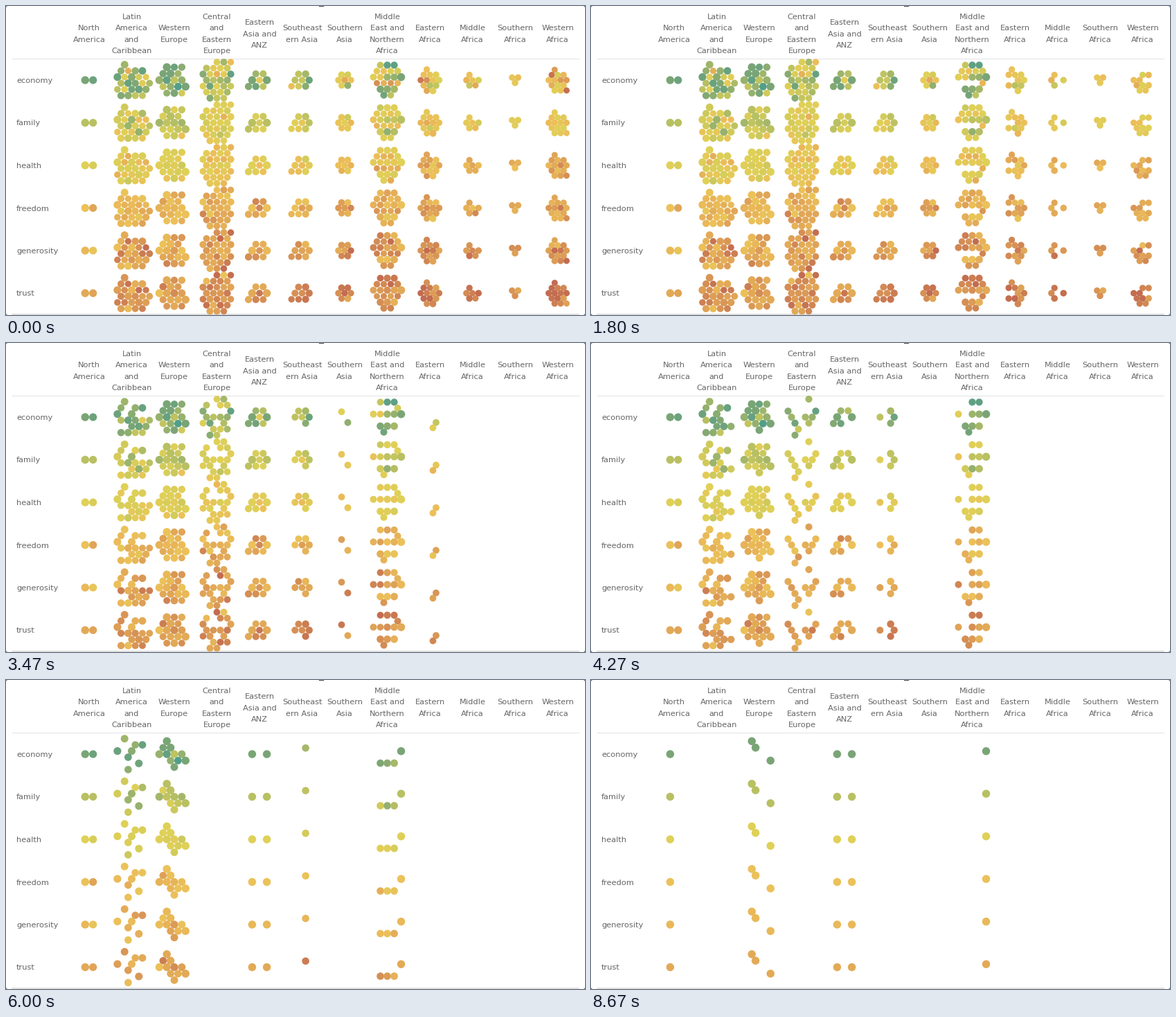
Recreate the animation shown at these times as a matplotlib script. Size 836 px wide and 446 px high, loop 8740 ms.

```python
import numpy as np
import matplotlib.pyplot as plt
from matplotlib.animation import FuncAnimation
from matplotlib.colors import LinearSegmentedColormap

W, H, DPI = 836, 446, 128
FRAMES, LOOP = 131, 8740
STEP = 61.5          # distance between columns and between rows
LEFT, TOP = 120, 107  # centre of the first cell
GREY = "#666666"
PX = 72 / DPI

rng = np.random.default_rng(11)
ramp = LinearSegmentedColormap.from_list(
    "score", ["#c36c50", "#dc9c56", "#ecbf59", "#dfd057",
              "#b8c062", "#7aa576", "#4c9d8c"])

# Each factor: base, gain with happiness, cap, noise (in colour steps).
FACTORS = {"economy": (-.4, 9, 5, .5), "family": (1.7, 2.8, 4, .4),
           "health": (.4, 4.2, 3, .25), "freedom": (1, 1.1, 2.2, .4),
           "generosity": (.4, 1.4, 2.2, .45), "trust": (.1, 1.3, 2, .4)}

dots = []  # x, y, radius, colour step, frame at which the dot leaves


def region(col, rows, pitch, span, late=(), stay=(), lean=0):
    """Hex-packed cluster given by its row lengths.

    Dots leave evenly over the frames in span, in random order except for
    the late ones; those in stay never leave. lean shifts the first row
    by half steps.
    """
    cells = []
    for i, n in enumerate(rows):
        k = 1 - n + (lean if i == 0 else 0)
        if i == 0:
            parity = k
        elif (k + i - parity) % 2:
            k += -1 if i < 3 else 1
        y = (i - (len(rows) - 1) / 2) * pitch * .866
        cells += [((k / 2 + j) * pitch, y) for j in range(n)]

    others = [i for i in range(len(cells)) if i not in late + stay]
    order = [*rng.permutation(others), *late]
    leave = np.full(len(cells), FRAMES)
    leave[np.array(order, int)] = np.linspace(*span, len(order))

    for (x, y), end in zip(cells, leave):
        happy = end / FRAMES
        for r, (base, gain, cap, noise) in enumerate(FACTORS.values()):
            level = min(base + gain * happy, cap) + rng.normal(0, noise)
            if end == FRAMES:
                level = min(base + gain * happy, cap)
            dots.append((LEFT + col * STEP + x, TOP + r * STEP + y,
                         4.25 + 1.5 * happy, level, end))


HEADS = ["North\nAmerica", "Latin\nAmerica\nand\nCaribbean",
         "Western\nEurope", "Central\nand\nEastern\nEurope",
         "Eastern\nAsia and\nANZ", "Southeast\nern Asia",
         "Southern\nAsia", "Middle\nEast and\nNorthern\nAfrica",
         "Eastern\nAfrica", "Middle\nAfrica", "Southern\nAfrica",
         "Western\nAfrica"]

region(0, (2,), 11.4, (118, 118), stay=(0,))
region(1, (1, 4, 5, 5, 5, 4), 10.3, (34, 118), late=(0, 18, 7, 5), lean=-2)
region(2, (3, 3, 4, 4, 3), 10.8, (58, 129), late=(15, 9, 8, 7, 6),
       stay=(0, 4, 13))
region(3, (3, 4, 5, 4, 5, 4, 3), 10, (42, 78), late=(17,), lean=2)
region(4, (2, 3, 3), 10.6, (54, 82), late=(5,), stay=(2, 4))
region(5, (2, 3, 3), 10.2, (40, 90), late=(4, 1))
region(6, (2, 3, 2), 9, (32, 61), late=(0, 6))
region(7, (3, 4, 5, 4, 3, 2), 10, (18, 102), late=(1, 9, 10, 16, 17, 18),
       stay=(11,))
region(8, (1, 3, 4, 3, 2), 8.9, (18, 58), late=(3, 12, 10), lean=-1)
region(9, (1, 3, 2), 8.7, (20, 50), late=(1, 3, 4), lean=-1)
region(10, (2, 1), 8.7, (30, 48), late=(1, 2))
region(11, (1, 3, 4, 3, 3), 8.6, (18, 42), late=(11, 9, 10), lean=-1)

x, y, radius, level, leave = np.array(dots).T
area = (2 * radius * PX) ** 2

fig = plt.figure(figsize=(W / DPI, H / DPI), dpi=DPI, facecolor="white")
ax = fig.add_axes([0, 0, 1, 1])
ax.set(xlim=(0, W), ylim=(H, 0))
ax.axis("off")


def label(tx, ty, s, ha):
    ax.text(tx, ty, s, fontsize=11.4 * PX, ha=ha, va="center_baseline",
            color=GREY, family="DejaVu Sans")


for i, head in enumerate(HEADS):
    lines = head.split("\n")
    for j, line in enumerate(lines):
        label(LEFT + i * STEP, 39.5 + (j - (len(lines) - 1) / 2) * 16.5,
              line, "center")
for i, name in enumerate(FACTORS):
    label(15, TOP + i * STEP, name, "left")

ax.plot([9, 827], [75.5, 75.5], color="#e3e3e3", lw=PX)
ax.plot([9, 827], [444.5, 444.5], color="#d6d6d6", lw=1.5 * PX)
ax.plot([452, 458], [.4, .4], color="#555555", lw=1.2 * PX)
for cx, dx in ((0, 2), (W, -2)):
    for cy, dy in ((0, 2), (H, -2)):
        ax.fill([cx, cx + dx, cx], [cy, cy, cy + dy], color="#777777", lw=0)

marks = ax.scatter(x, y, s=area, c=ramp(level / 6), linewidths=0, zorder=3)


def update(k):
    marks.set_sizes(np.where(k < leave, area, 0), DPI)
    return [marks]


anim = FuncAnimation(fig, update, frames=FRAMES, interval=LOOP / FRAMES,
                     repeat=True, repeat_delay=0, blit=False)
plt.show()
```
